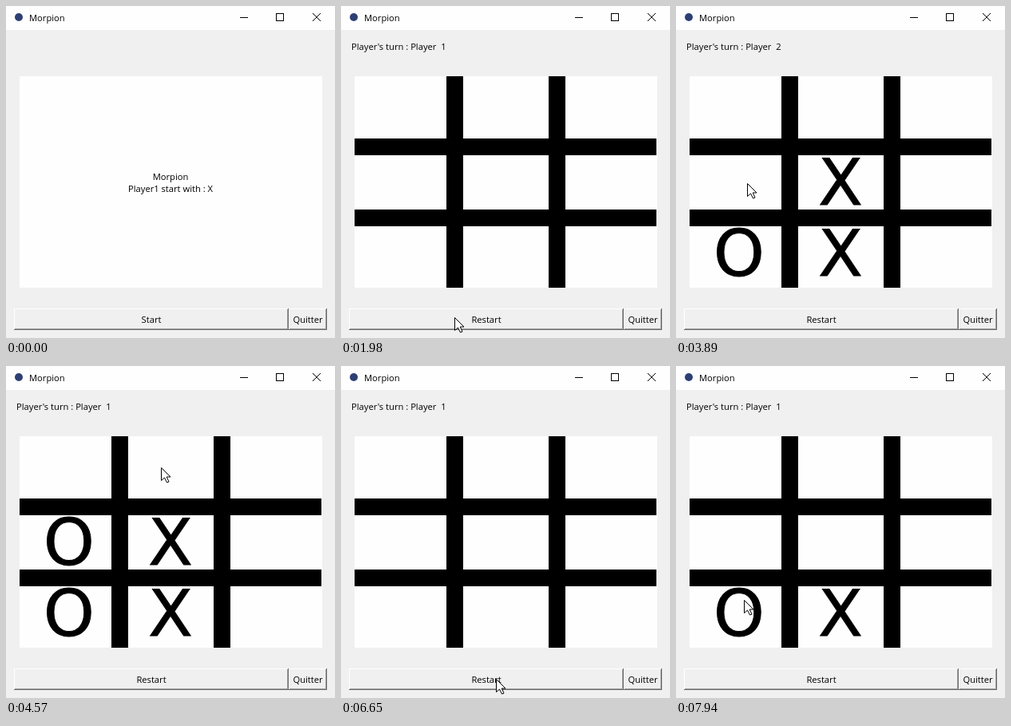
Recreate the animation shown at these times as an HTML page with a canvas. Size 412 by 416 pixels, loop 8000 ms.

```html
<!DOCTYPE html>
<html lang="fr">
<head>
<meta charset="utf-8">
<title>Morpion</title>
<style>
  html, body { margin: 0; width: 100%; height: 100%; overflow: hidden; background: #f0f0f0; }
  canvas { display: block; }
</style>
</head>
<body>
<canvas id="stage" width="412" height="416"></canvas>
<script>
const ctx = document.getElementById('stage').getContext('2d');
const LOOP = 8000, STEP = 530, DWELL = 60;
const FACE = '#f0f0f0', PAPER = '#fefefe', FADED = '#d4d4d4', BLUE = '#0000f0';
const UI = '11.2px "Open Sans", "Noto Sans", sans-serif';
const MARK = '81px "DejaVu Sans", sans-serif';
const BANNER = '52.5px "Liberation Sans", Arial, sans-serif';
const ARROW = new Path2D('M0 0V16L4 12.5L7 18.5L9.5 17.5L6.7 11.5H11.5Z');

const games = [
  { start: 1340, first: 2550, moves: 5 },
  { start: 6060, first: 7050, moves: 2 }
];

// Players alternate between the middle and left columns, from the bottom up
const cellOf = i => ({ mark: 'XO'[i % 2], col: 1 - i % 2, row: 2 - (i >> 1) });

const stop = (x, y, arrive, leave) => ({ x, y, arrive, leave });

function cellStops(game) {
  return Array.from({ length: game.moves }, (_, i) => {
    const { col, row } = cellOf(i), click = game.first + i * STEP;
    return stop(76 + col * 119, 128 + row * 95, click - DWELL, click + DWELL);
  });
}

const stops = [
  stop(232, 416, 480, 480),
  stop(143, 391, 1300, 2180),
  ...cellStops(games[0]),
  stop(195, 128, 4730, 5010),
  stop(195, 394, 5860, 6650),
  ...cellStops(games[1]),
  stop(86, 294, 7940, LOOP)
];

function rect(x, y, w, h, color) {
  ctx.fillStyle = color;
  ctx.fillRect(x, y, w, h);
}

function text(str, x, y, font = UI, align = 'left', color = '#000') {
  ctx.font = font;
  ctx.textAlign = align;
  ctx.fillStyle = color;
  ctx.fillText(str, x, y);
}

function line(x0, y0, x1, y1) {
  ctx.beginPath();
  ctx.moveTo(x0, y0);
  ctx.lineTo(x1, y1);
  ctx.stroke();
}

function drawTitleBar() {
  rect(0, 0, 412, 30, '#fefefe');
  ctx.fillStyle = '#2d3f73';
  ctx.beginPath();
  ctx.arc(16, 14, 5, 0, Math.PI * 2);
  ctx.fill();
  text('Morpion', 29, 19);
  ctx.strokeStyle = '#000';
  ctx.lineWidth = 1;
  line(293, 14.5, 303, 14.5);
  ctx.strokeRect(338.5, 9.5, 9, 9);
  line(384, 9, 394, 19);
  line(394, 9, 384, 19);
}

function drawButton(x, w, label) {
  const y = 379, h = 27;
  rect(x, y, w, h, '#696969');
  rect(x, y, w - 1, h - 1, '#fff');
  rect(x + 1, y + 1, w - 2, h - 2, '#a0a0a0');
  rect(x + 1, y + 1, w - 3, h - 3, FACE);
  text(label, x + w / 2, 397, UI, 'center');
}

function drawBar(x, y, w, h, faded) {
  rect(x, y, w, h, '#000');
  if (!faded) return;
  if (w < h) rect(x + 1, y, w - 2, h, FADED);
  else rect(x, y + 1, w, h - 2, FADED);
}

function drawMark(i, color) {
  const { mark, col, row } = cellOf(i);
  const x = 79 + col * 127, y = 159 + row * 89.5;
  text(mark, x, y, MARK, 'center', color);
  ctx.strokeStyle = color;
  ctx.lineWidth = 1;
  ctx.strokeText(mark, x, y);
}

function drawGame(game, t) {
  const due = Math.floor((t - game.first) / STEP) + 1;
  const played = Math.max(0, Math.min(game.moves, due));
  const won = played === 5;
  text("Player's turn : Player\u00a0 " + (played % 2 + 1), 13, 55);
  for (const x of [132, 260]) drawBar(x, 88, 21, 265, won);
  for (const y of [166, 255]) drawBar(17, y, 378, 21, won);
  for (let i = 0; i < played; i++) drawMark(i, won ? FADED : '#000');
  if (won) {
    text('Winner', 111.5, 208, BANNER, 'left', BLUE);
    text('Player 1', 111.5, 269, BANNER, 'left', BLUE);
  }
}

function drawPointer(t) {
  const i = stops.findIndex(s => t < s.leave);
  if (i < 1) return;
  const a = stops[i - 1], b = stops[i];
  const u = Math.min(1, (t - a.leave) / (b.arrive - a.leave));
  const k = 1 - (1 - u) ** 2.75;
  ctx.save();
  ctx.translate(Math.round(a.x + (b.x - a.x) * k) - 0.5, Math.round(a.y + (b.y - a.y) * k) - 0.5);
  ctx.fillStyle = '#fff';
  ctx.strokeStyle = '#000';
  ctx.lineWidth = 1;
  ctx.fill(ARROW);
  ctx.stroke(ARROW);
  ctx.restore();
}

function draw(t) {
  rect(0, 0, 412, 416, FACE);
  drawTitleBar();
  rect(17, 88, 379, 265, PAPER);
  const game = games.filter(g => t >= g.start).pop();
  if (game) {
    drawGame(game, t);
  } else {
    text('Morpion', 206, 218, UI, 'center');
    text('Player1 start with : X', 206, 233, UI, 'center');
  }
  drawButton(10, 344, game ? 'Restart' : 'Start');
  drawButton(354, 48, 'Quitter');
  drawPointer(t);
}

const begin = performance.now();
function tick() {
  draw((performance.now() - begin) % LOOP);
  requestAnimationFrame(tick);
}
tick();
</script>
</body>
</html>
```
